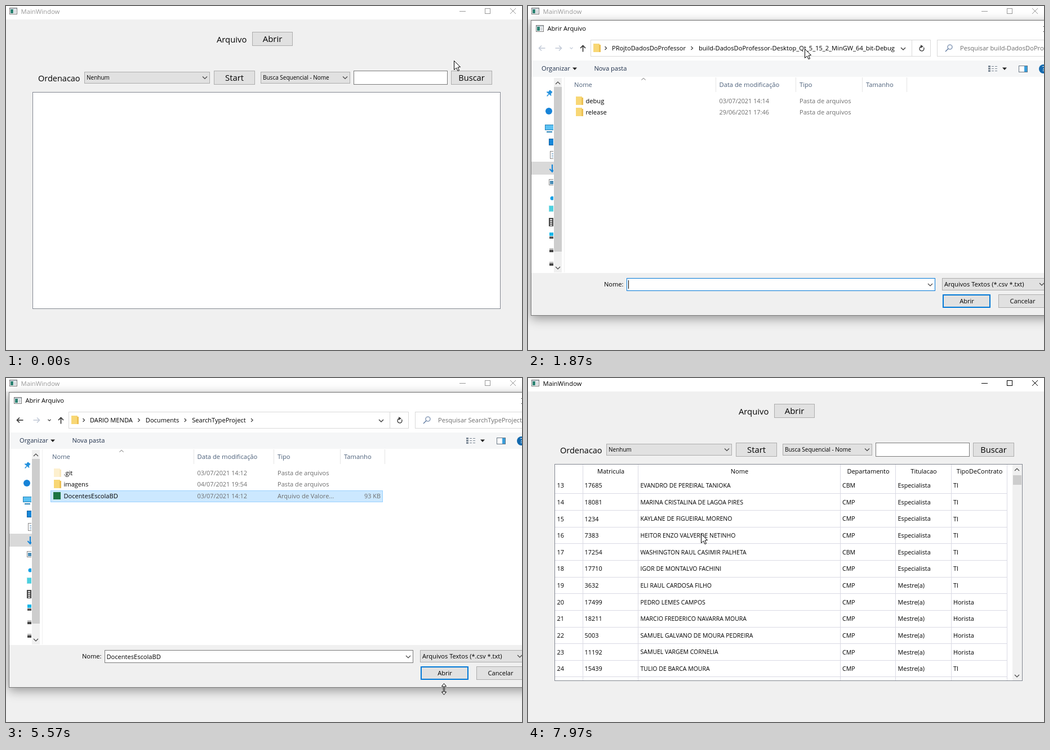
These frames come from a looping animation (916 px wide and 612 px high, 8 s). An HTML page with a canvas:

```html
<!DOCTYPE html>
<html lang="pt">
<head>
<meta charset="utf-8">
<title>MainWindow</title>
<style>
html, body { margin: 0; width: 100%; height: 100%; overflow: hidden; background: #f0f0f0; }
canvas { display: block; }
</style>
</head>
<body>
<canvas id="stage" width="916" height="612"></canvas>
<script>
const LOOP = 8000;
const BLUE = '#0078d7', INK = '#000', GRAY = '#6d6d6d', FACE = '#e1e1e1', EDGE = '#adadad';
const stage = document.getElementById('stage').getContext('2d');
const layer = document.createElement('canvas');
layer.width = 960;
layer.height = 612;
const dialogCtx = layer.getContext('2d');
let c = stage;

// Times of the story
const CLICK_OPEN = 650, DIALOG_IN = 800, DIALOG_READY = 1800, TOOLS_SHOWN = 1600;
const EDIT_PATH = 2450, PASTE = 2950, NAVIGATE = 3400, PICK = 4650;
const DIALOG_OUT = 5880, DIALOG_GONE = 6330, SCROLL = 7570;

const USER = 'DARIO MENDA';
const BUILD = 'build-DadosDoProfessor-Desktop_Qt_5_15_2_MinGW_64_bit-Debug';

const TITLES = { E: 'Especialista', M: 'Mestre(a)', P: 'Pos-Doutor(a)', D: 'Doutor(a)' };
const ROWS = `18030|OTAVIO REMIGIO FARIAS LUZ|CBM|E|Horista
17374|LORENA BEATRIZ DA VARZEA|CBM|M|Horista
12042|VALDEMIR ABEL DA COLINA PRADO|CBM|M|Horista
13998|BRUNO FONTELA DE ARRUDAS|CBM|P|Horista
1954|RENATO PEDROSINA VALADO|CMP|D|TI
4820|FABIO PRATEADO DA SERRA|CMP|D|TI
3200|IVAN TELMO DA MATTA|CMP|D|TI
15423|NADIR DE LIMOS FAUSTAL|CMP|D|TI
6928|CAMILA BRENNO DE OLIVARES|CBM|D|Horista
17670|SERGIO PINHAIS DA ROCHA|CMP|D|TI
8939|LEANDRO HELIO DE PAVA|CMP|E|TI
16791|WESLEY MARCONDES DE CAMPINA|CMP|E|TI
17685|EVANDRO DE PEREIRAL TANIOKA|CBM|E|TI
18081|MARINA CRISTALINA DE LAGOA PIRES|CMP|E|TI
1234|KAYLANE DE FIGUEIRAL MORENO|CMP|E|TI
7383|HEITOR ENZO VALVERDE NETINHO|CMP|E|TI
17254|WASHINGTON RAUL CASIMIR PALHETA|CBM|E|TI
17710|IGOR DE MONTALVO FACHINI|CMP|E|TI
3632|ELI RAUL CARDOSA FILHO|CMP|M|TI
17499|PEDRO LEMES CAMPOS|CMP|M|Horista
18211|MARCIO FREDERICO NAVARRA MOURA|CMP|M|Horista
5003|SAMUEL GALVANO DE MOURA PEDREIRA|CMP|M|Horista
11192|SAMUEL VARGEM CORNELIA|CMP|M|Horista
15439|TULIO DE BARCA MOURA|CMP|M|TI`.split('\n').map(r => r.split('|'));

// Pointer stops: time, x, y
const PATH = [
  [0, 795, 97], [700, 463, 75], [1700, 463, 75], [2350, 626, 79], [3250, 626, 79],
  [4100, 267, 220], [4800, 267, 220], [5450, 777, 553], [5620, 777, 553], [5780, 776, 529],
  [6680, 776, 529], [7130, 57, 310], [7290, 190, 254], [7470, 307, 277], [8000, 307, 277]
];

const clamp = (v, a = 0, b = 1) => Math.min(b, Math.max(a, v));
const span = (t, a, b) => clamp((t - a) / (b - a));

function box(x, y, w, h, fill, edge, weight = 1) {
  if (fill) { c.fillStyle = fill; c.fillRect(x, y, w, h); }
  if (edge) {
    c.strokeStyle = edge;
    c.lineWidth = weight;
    c.strokeRect(x + weight / 2, y + weight / 2, w - weight, h - weight);
  }
}

function text(s, x, y, size = 11.1, color = INK, align = 'left') {
  c.font = '500 ' + size + 'px "Open Sans", "Noto Sans", sans-serif';
  c.textAlign = align;
  c.fillStyle = color;
  c.fillText(s, x, Math.round(y + size * 0.36));
}

function line(points, color, weight = 1) {
  c.beginPath();
  points.forEach(([x, y]) => c.lineTo(x, y));
  c.strokeStyle = color;
  c.lineWidth = weight;
  c.stroke();
}

function shape(points, fill, edge) {
  c.beginPath();
  points.forEach(([x, y]) => c.lineTo(x, y));
  c.closePath();
  c.fillStyle = fill;
  c.fill();
  if (edge) { c.strokeStyle = edge; c.lineWidth = 1; c.stroke(); }
}

function disc(x, y, r, fill) {
  c.beginPath();
  c.arc(x, y, r, 0, 7);
  c.fillStyle = fill;
  c.fill();
}

function clipped(x, y, w, h, draw) {
  c.save();
  c.beginPath();
  c.rect(x, y, w, h);
  c.clip();
  draw();
  c.restore();
}

const down = (x, y, r = 4, color = '#444', weight = 1.2) =>
  line([[x - r, y - r / 2], [x, y + r / 2], [x + r, y - r / 2]], color, weight);
const up = (x, y, r = 4, color = '#444', weight = 1.2) =>
  line([[x - r, y + r / 2], [x, y - r / 2], [x + r, y + r / 2]], color, weight);
const next = (x, y) => line([[x - 1.5, y - 3], [x + 1.5, y], [x - 1.5, y + 3]], '#444', 1.3);
const caret = (x, y) => shape([[x - 4, y - 2], [x + 4, y - 2], [x, y + 2.5]], '#222');

function arrow(x, y, angle, color) {
  c.save();
  c.translate(x, y);
  c.rotate(angle);
  line([[-5.5, 0], [5.5, 0]], color, 1.6);
  line([[-1, -4.5], [-5.5, 0], [-1, 4.5]], color, 1.6);
  c.restore();
}

function button(label, x, y, w, h, size, hot) {
  box(x, y, w, h, hot ? '#e5f1fb' : FACE, hot ? BLUE : EDGE);
  text(label, x + w / 2, y + h / 2 + 0.5, size, INK, 'center');
}

function combo(label, x, y, w, h, size) {
  box(x, y, w, h, FACE, EDGE);
  text(label, x + 4, y + h / 2, size);
  down(x + w - 9, y + h / 2);
}

function appIcon(x, y) {
  box(x, y, 14, 12, '#fff', '#777');
  box(x + 1, y + 1, 12, 2, '#c4ced6');
  box(x + 2, y + 3, 5, 7, '#2d8272');
  box(x + 8, y + 4, 4, 6, '#d5d9dd');
}

function folder(x, y, pale) {
  box(x, y, 11, 15, pale ? '#fdf0cf' : '#f8d775');
  box(x + 10, y + 2, 3, 13, pale ? '#f9e8bd' : '#ecc054');
}

function mainWindow(t) {
  const active = (t > CLICK_OPEN && t < DIALOG_IN) || t > DIALOG_OUT + 50;
  const tone = active ? INK : '#999';
  box(0, 0, 916, 612, '#f0f0f0');
  box(0, 0, 916, 24, '#fff');
  appIcon(6, 3);
  text('MainWindow', 26.5, 9.5, 11.3, tone);
  line([[805, 9.5], [816, 9.5]], tone);
  box(850, 4, 10, 10, null, tone);
  line([[895, 4], [905, 14]], tone);
  line([[905, 4], [895, 14]], tone);

  text('Arquivo', 374, 59.5, 14.8);
  button('Abrir', 437, 46, 72, 25, 15, t > CLICK_OPEN - 60 && t < DIALOG_READY);
  text('Ordenacao', 57, 128.5, 14.5);
  combo('Nenhum', 139, 117, 223, 21, 10);
  button('Start', 369, 115, 73, 25, 14.8);
  combo('Busca Sequencial - Nome', 452, 117, 159, 21, 10);
  box(617, 115, 167, 25, '#fff', '#7a7a7a');
  button('Buscar', 790, 115, 73, 25, 14.6);

  box(47, 153, 831, 386, '#fff', '#828790');
  if (t >= DIALOG_GONE) table(t);
}

function table(t) {
  const first = clamp(Math.floor((t - SCROLL) / 33.3) + 1, 0, 12);
  const grid = '#dadae4', pitch = 29.64;
  clipped(48, 154, 829, 384, () => {
    for (const x of [97, 195, 554, 652, 751, 850]) box(x, 154, 1, 384, grid);
    for (let i = 0; i < 12; i++) {
      const y = 191.3 + i * pitch, n = first + i;
      const [id, name, dep, title, kind] = ROWS[n];
      box(48, Math.round(205.4 + i * pitch), 803, 1, grid);
      text(n + 1, 51.5, y, 10.9);
      text(id, 100.5, y, 10.9);
      text(name, 199.5, y, 10.5);
      text(dep, 558, y, 10.6);
      text(TITLES[title], 656.5, y, 10.8);
      text(kind, 755, y, 10.9);
    }
    const heads = { Matricula: 147, Nome: 375.5, Departamento: 604, Titulacao: 702.5, TipoDeContrato: 801.5 };
    for (const h in heads) text(h, heads[h], 166, 11, INK, 'center');
    box(860, 154, 17, 384, '#f0f0f0');
    box(861, Math.round(171 + first / 6), 15, 17, '#cdcdcd');
    up(868, 163);
    down(868, 530);
  });
}

function sidebar() {
  box(6, 277, 40, 23, '#d9d9d9');
  clipped(6, 127, 39, 347, () => {
    c.save();
    c.translate(38, 155);
    c.rotate(0.7);
    box(-3, -5, 6, 6, '#2491dd');
    box(-5, 0, 10, 2, '#2491dd');
    box(-0.5, 2, 1.5, 5, '#2491dd');
    c.restore();
    disc(37, 187, 6, '#1683d8');
    box(30, 211, 16, 10, '#5bc1f2', '#2582b8');
    box(33, 223, 10, 2, '#2582b8');
    box(37, 236, 10, 12, '#1687d9', '#0a5d9e');
    box(39, 258, 9, 14, '#fff', '#888');
    for (let i = 0; i < 3; i++) box(42, 262 + i * 3, 4, 1, '#669ac4');
    line([[43, 282], [43, 294]], '#1687d9', 2.2);
    line([[38.5, 290], [43, 295], [47, 290]], '#1687d9', 2);
    box(37, 308, 10, 11, '#fff', '#888');
    box(39, 311, 7, 6, '#4a8db5');
    disc(43, 342, 3.5, '#15a0e5');
    box(37, 355, 10, 11, '#4bd0df', '#8bdce5');
    box(37, 377, 10, 15, '#444');
    for (let i = 0; i < 4; i++) box(39, 379 + i * 3.3, 4, 2, '#ddd');
    box(38, 403, 7, 6, '#18b7e8');
    box(38, 410, 8, 4, '#555');
    for (const y of [434, 458]) {
      box(38, y - 3, 8, 3, '#bbb');
      box(38, y, 8, 4, '#444');
    }
  });
  box(46, 128, 14, 346, '#f0f0f0');
  box(46, 144, 14, 293, '#cdcdcd');
  up(53, 137);
  down(53, 466);
}

function crumbs(names, x) {
  next(x, 75);
  x += 11;
  for (const name of names) {
    text(name, x, 75);
    x += c.measureText(name).width + 12;
    next(x - 1, 75);
    x += 11;
  }
}

function address(t) {
  const editing = t >= EDIT_PATH && t < NAVIGATE;
  const moved = t >= NAVIGATE;
  box(111, 60, 604, 30, '#fff', '#d9d9d9');
  box(681, 60, 1, 30, '#d9d9d9');
  if (editing) box(111, 60, 570, 30, null, BLUE);
  folder(116, 67);
  clipped(134, 61, 520, 28, () => {
    if (!editing) {
      crumbs(moved ? [USER, 'Documents', 'SearchTypeProject'] : ['PRojtoDadosDoProfessor', BUILD], 138);
    } else if (t < PASTE) {
      box(134, 68, 515, 15, BLUE);
      text('C:\\Users\\' + USER + '\\Downloads\\PRojtoDadosDoProfessor\\' + BUILD, 649, 75.5, 11, '#fff', 'right');
    } else {
      const path = 'C:\\Users\\' + USER + '\\Documents\\SearchTypeProject';
      text(path, 135, 75.5);
      box(136 + c.measureText(path).width, 68, 1, 15, INK);
    }
  });
  down(666, 76, 4, '#444', 1.5);
  c.beginPath();
  c.arc(699, 76, 4, -0.6, 4.4);
  c.strokeStyle = '#444';
  c.lineWidth = 1.4;
  c.stroke();
  shape([[697, 69], [702, 72], [697, 75]], '#444');
  box(726, 60, 195, 30, '#fff', '#d9d9d9');
  c.beginPath();
  c.arc(749, 73, 4, 0, 7);
  c.strokeStyle = '#56729a';
  c.lineWidth = 1.1;
  c.stroke();
  line([[746, 76], [741, 81]], '#56729a', 1.3);
  clipped(727, 61, 193, 28, () =>
    text('Pesquisar ' + (moved ? 'SearchTypeProject' : BUILD), 767, 75, 11.1, GRAY));
}

function files(t) {
  const moved = t >= NAVIGATE + 60;
  const list = moved
    ? [['.git', '03/07/2021 14:12'], ['imagens', '04/07/2021 19:54'], ['DocentesEscolaBD', '03/07/2021 14:12']]
    : [['debug', '03/07/2021 14:14'], ['release', '29/06/2021 17:46']];
  const p = pointer(t);
  if (t >= PICK) box(79, 200, 590, 21, '#cce8ff', '#99d1ff');
  else if (moved && p.y >= 200 && p.y <= 221 && p.x < 669) box(79, 200, 590, 21, '#e5f3ff');
  list.forEach(([name, date], i) => {
    const y = 168.7 + i * 20.6, sheet = i === 2;
    if (sheet) box(84, 203, 13, 13, '#1d7544');
    else folder(85, Math.round(y - 8), moved && i === 0);
    text(name, 102.5, y);
    text(date, 339.5, y, 10.9, GRAY);
    text(sheet ? 'Arquivo de Valore...' : 'Pasta de arquivos', 482, y, 11.1, GRAY);
    if (sheet) text('93 KB', 665, y, 10.9, GRAY, 'right');
  });
}

function dialog(t) {
  c = dialogCtx;
  c.clearRect(0, 0, 960, 612);
  c.shadowColor = 'rgba(0,0,0,.38)';
  c.shadowBlur = 18;
  c.shadowOffsetY = 5;
  box(5, 25, 928, 526, '#fff');
  c.shadowColor = 'transparent';
  box(5, 25, 928, 526, '#fff', '#777');
  appIcon(14, 34);
  text('Abrir Arquivo', 34.5, 40.5);
  line([[915, 36], [925, 46]], INK);
  line([[925, 36], [915, 46]], INK);

  const ready = t >= TOOLS_SHOWN;
  const pale = '#c3cbd8';
  arrow(25, 75, 0, t >= NAVIGATE ? '#333' : pale);
  arrow(54, 75, Math.PI, pale);
  down(77, 75, 2.5, t >= NAVIGATE ? '#444' : pale);
  arrow(97.5, 76, Math.PI / 2, '#333');
  if (ready) address(t);

  box(6, 97, 926, 29, '#f5f6f7');
  if (ready) {
    text('Organizar', 24, 111.5, 11.1, '#1e2f4a');
    caret(83, 111.5);
    text('Nova pasta', 117.5, 111.5, 11.1, '#1e2f4a');
    for (let i = 0; i < 3; i++) {
      box(817, 106 + i * 4, 4, 3, '#7b8794');
      box(823, 107 + i * 4, 4, 1, '#7b8794');
      box(829, 107 + i * 4, 4, 1, '#7b8794');
    }
    caret(846, 111.5);
  }
  box(871, 106, 16, 12, '#fff', '#667582');
  box(881, 107, 5, 10, '#3a9edb');
  disc(915, 112, 8, '#1369ae');
  text('?', 915, 112, 12, '#fff', 'center');

  sidebar();
  box(64, 127, 1, 347, '#f0f0f0');
  const heads = { Nome: 82, 'Data de modificação': 339.5, Tipo: 482, Tamanho: 600 };
  for (const h in heads) text(h, heads[h], 140, 11.2, '#4c607a');
  for (const x of [333, 475, 593, 672]) box(x, 127, 1, 26, '#e5e5e5');
  up(205, 130, 3.5, '#666', 1);
  files(t);

  box(6, 475, 926, 75, '#f0f0f0');
  text('Nome:', 169.5, 495.5, 11.1, INK, 'right');
  const focus = t < EDIT_PATH;
  box(175, 484, 548, 23, '#fff', focus ? BLUE : '#7a7a7a');
  if (focus) box(178, 488, 1, 15, INK);
  if (t >= PICK) text('DocentesEscolaBD', 178.5, 496);
  down(714, 496);
  combo('Arquivos Textos (*.csv *.txt)', 735, 484, 186, 22, 11.1);
  const hot = t > 5690;
  box(736, 513, 85, 24, hot ? '#e5f1fb' : FACE, BLUE, 2);
  text('Abrir', 779, 525, 11.1, INK, 'center');
  button('Cancelar', 835, 513, 86, 24, 11.1);
  c = stage;
}

function showDialog(t) {
  if (t < DIALOG_IN || t >= DIALOG_GONE) return;
  dialog(t);
  const enter = span(t, DIALOG_IN, DIALOG_READY);
  const leave = span(t, DIALOG_OUT, DIALOG_GONE);
  const scale = 1 - 0.1 * (1 - enter) ** 2 - 0.1 * leave ** 2;
  c.save();
  c.globalAlpha = clamp(enter * 1.12) * (1 - leave);
  c.translate(466, 288);
  c.scale(scale, scale);
  c.drawImage(layer, -466, -288);
  c.restore();
}

function pointer(t) {
  const i = PATH.findIndex(p => p[0] > t);
  const [ta, xa, ya] = PATH[i - 1], [tb, xb, yb] = PATH[i];
  const k = span(t, ta, tb), e = k * k * (3 - 2 * k);
  return { x: xa + (xb - xa) * e, y: ya + (yb - ya) * e };
}

function drawPointer(t) {
  const { x, y } = pointer(t);
  c.save();
  c.translate(Math.round(x) + 0.5, Math.round(y) + 0.5);
  if (t > 1900 && t < NAVIGATE && y > 60 && y < 90 && x > 480) {
    line([[0, -7], [0, 7]], INK);
    line([[-3, -7], [3, -7]], INK);
    line([[-3, 7], [3, 7]], INK);
  } else if (t > 5000 && t < 5800 && y > 544) {
    shape([[0, -10], [4, -5], [1, -5], [1, 5], [4, 5], [0, 10], [-4, 5], [-1, 5], [-1, -5], [-4, -5]], '#fff', INK);
  } else {
    shape([[0, 0], [0, 16], [4, 12.5], [6.5, 18], [9, 17], [6.5, 11.5], [11, 11]], '#fff', INK);
  }
  c.restore();
}

function frame() {
  const t = performance.now() % LOOP;
  mainWindow(t);
  showDialog(t);
  drawPointer(t);
  requestAnimationFrame(frame);
}
frame();
</script>
</body>
</html>
```
